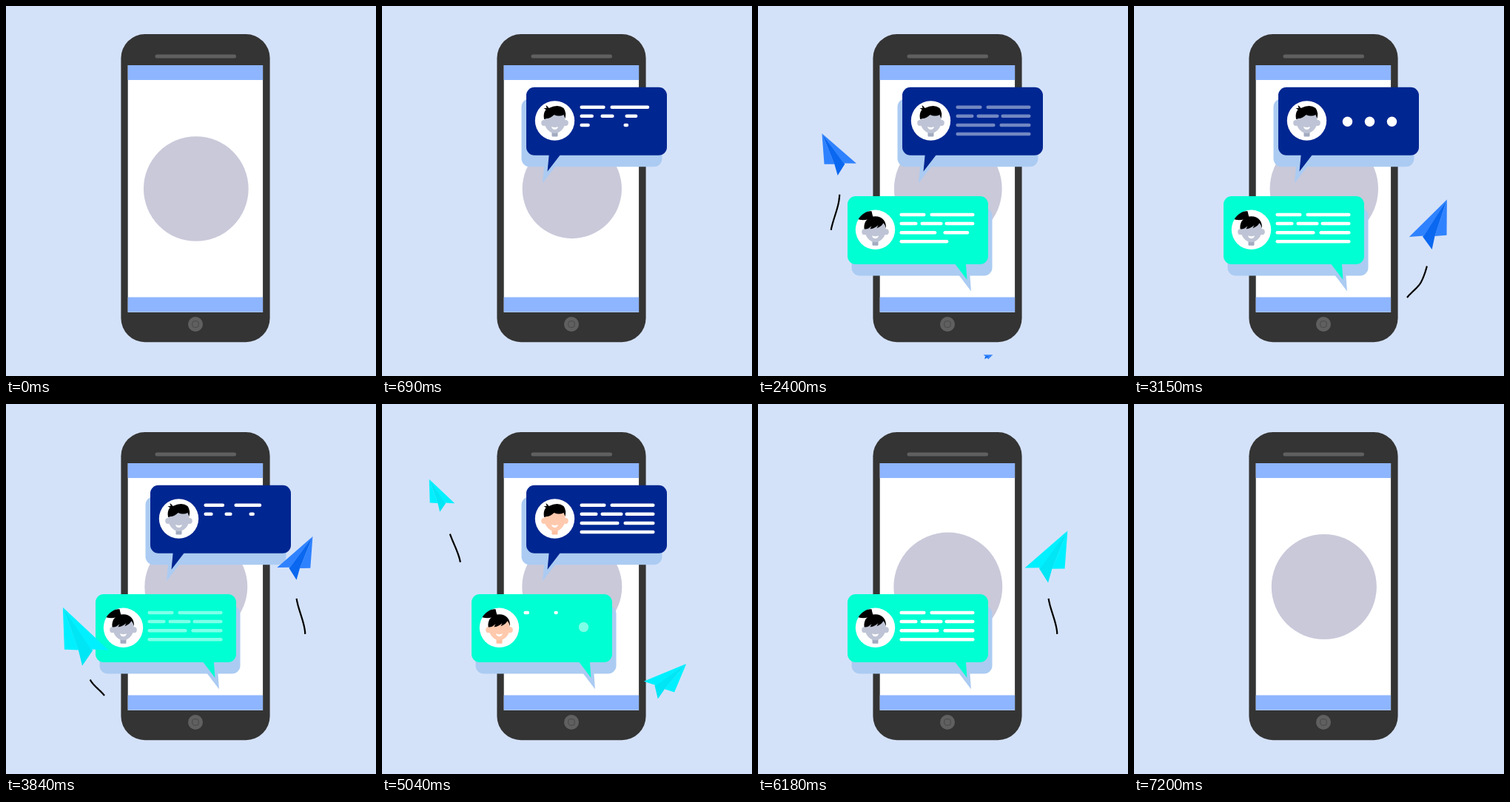
These frames come from a looping animation (500x500 px, 7230 ms). An HTML page with a canvas:

```html
<!DOCTYPE html>
<html>
<head>
<meta charset="utf-8">
<style>
html, body { margin: 0; width: 100%; height: 100%; overflow: hidden; background: #d4e2f9; }
canvas { display: block; width: 500px; height: 500px; }
</style>
</head>
<body>
<canvas id="stage" width="500" height="500"></canvas>
<script>
const g = document.getElementById('stage').getContext('2d');
const LOOP = 7230;

const clamp = v => Math.max(0, Math.min(1, v));
const ease = v => { v = clamp(v); return v * v * (3 - 2 * v); };
const ramp = (t, from, len) => ease((t - from) / len);

// Smooth curve through [input, value] pairs with ascending inputs
function curve(keys) {
  const slope = i => {
    const a = keys[Math.max(0, i - 1)], b = keys[Math.min(keys.length - 1, i + 1)];
    return (b[1] - a[1]) / (b[0] - a[0]);
  };
  return v => {
    let i = 0;
    while (i < keys.length - 2 && v > keys[i + 1][0]) i++;
    const [a, p] = keys[i], [b, q] = keys[i + 1];
    const d = b - a, u = clamp((v - a) / d), w = 1 - u;
    return p * w * w * (1 + 2 * u) + slope(i) * d * u * w * w
         + q * u * u * (3 - 2 * u) - slope(i + 1) * d * u * u * w;
  };
}

function box(x, y, w, h, r, color) {
  g.fillStyle = color;
  g.beginPath();
  g.roundRect(x, y, w, h, r);
  g.fill();
}

function poly(color, ...pts) {
  g.fillStyle = color;
  g.beginPath();
  for (let i = 0; i < pts.length; i += 2) g.lineTo(pts[i], pts[i + 1]);
  g.fill();
}

function oval(x, y, rx, ry, color) {
  g.fillStyle = color;
  g.beginPath();
  g.ellipse(x, y, rx, ry, 0, 0, 7);
  g.fill();
}

function shape(color, d) {
  g.fillStyle = color;
  g.fill(new Path2D(d));
}

function group(draw) {
  g.save();
  draw();
  g.restore();
}

function phone(t) {
  box(155.4, 38, 201.2, 416.3, 32.5, '#343434');
  box(201.5, 65.5, 109.5, 5, 2.5, '#606060');
  box(164.7, 80, 182.4, 334, 0, '#fff');
  box(164.7, 80, 182.4, 20, 0, '#8eb5ff');
  box(164.7, 393.4, 182.4, 20.4, 0, '#8eb5ff');
  oval(256, 430, 10, 10, '#606060');
  g.strokeStyle = '#484848';
  g.lineWidth = 1;
  g.beginPath();
  g.roundRect(251.8, 425.8, 8.4, 8.4, 2.5);
  g.stroke();
  const r = 70.2 + 3.6 * Math.cos(2 * Math.PI * (t / LOOP * 2 - 0.78));
  oval(256.8, 247, r, r, '#c9c9da');
}

// Head drawn around the centre of its white disc
function avatar(bun, skin, neck) {
  oval(0, 0, 26.7, 26.7, '#fff');
  box(-4, 12, 8, 9.5, 1, neck);
  oval(-14.5, 3, 3.8, 4, skin);
  oval(14.5, 3, 3.8, 4, skin);
  shape(skin, 'M-14 -5 Q-14 -16 0 -16 Q14 -16 14 -5 V3 C13 11 6 17 0 17 C-6 17 -13 11 -14 3 Z');
  shape('#fff', 'M-4.5 8 Q0 10 4.5 8 Q3.5 12 0 12 Q-3.5 12 -4.5 8 Z');
  if (bun) {
    shape('#000', 'M-23 -14 C-19 -21 -11 -26 -5 -25 Q-4 -20 -3 -17 Q-13 -11 -23 -14 Z');
    shape('#000', 'M-15 -1 C-16 -12 -9 -18 0 -18 C10 -18 15 -11 14.5 -2 Q13 -7 11 -9 Q8 -4 2 -2 L4 -6 Q-2 -1 -7 -1 L-5 -5 Q-10 0 -15 -1 Z');
  } else {
    shape('#000', 'M-14.5 -2 Q-16 -10 -12 -15 L-15 -17 L-11 -17 L-12 -21 Q-9 -19 -8 -17 Q4 -23 12 -17 Q16 -11 14 -3 L12 -8 Q6 -5 -1 -8 Q-6 -3 -11 -3 Z');
  }
}

// Text strokes: line number, start, end
const STROKES = [
  [0, 0, 35], [0, 41, 101], [1, 0, 24], [1, 28, 58], [1, 61, 101],
  [2, 0, 53], [2, 59, 101], [3, 0, 101]
];

function typed(t, start) {
  g.strokeStyle = '#fff';
  g.lineWidth = 4.5;
  g.lineCap = 'round';
  STROKES.forEach(([line, a, b], i) => {
    const k = ramp(t, start + i * 60, 480);
    if (k < 0.012) return;
    const y = line * 12.1, x = a + 2.2;
    g.beginPath();
    g.moveTo(x, y);
    g.lineTo(x + (b - a - 4.4) * k, y);
    g.stroke();
  });
}

function bubbleText(t, b, alpha) {
  if (t < b.retype) {
    g.globalAlpha = alpha * (1 - ramp(t, b.fade, 300));
    typed(t, b.type);
  }
  for (let i = 0; i < 3; i++) {
    const show = ramp(t, b.fade + 300 + i * 120, 240);
    const hide = ramp(t, b.retype - 265 + i * 120, 240);
    g.globalAlpha = alpha * show * (1 - hide);
    oval(21 + i * 30, 19.5, 6.7, 6.7, '#fff');
  }
  g.globalAlpha = alpha;
  typed(t, b.retype);
}

function body(b, color) {
  box(0, 0, 190, 92, 11, color);
  poly(color, ...b.tail);
}

function bubble(t, b) {
  const s = ramp(t, b.open, 400) * (1 - ramp(t, b.close, 430));
  if (s < 0.01) return;
  const inner = clamp(s * 2 - 1);
  const warm = t > 4500 && t < 5400;
  group(() => {
    const [px, py] = b.pivot;
    g.translate(px, py);
    g.rotate(b.side * (1 - s) * Math.PI / 2);
    g.scale(s, s);
    g.translate(b.x - px, b.y - py);
    group(() => {
      g.translate(b.shade * inner, 15.5 * inner);
      body(b, '#abcbf2');
    });
    body(b, b.color);
    group(() => {
      g.translate(b.face, 45.3);
      g.scale(inner, inner);
      avatar(b.bun, warm ? '#ffc9ad' : '#bec4d5', warm ? '#ffc0a0' : '#a3abc0');
    });
    group(() => {
      g.translate(b.text[0], b.text[1]);
      bubbleText(t, b, inner);
    });
  });
}

const BUBBLES = [
  { x: 195, y: 109.7, color: '#002691', side: -1, pivot: [251, 243], shade: -6.5,
    tail: [31, 88, 28.5, 114, 50, 86], face: 38.5, bun: false, text: [72.5, 27],
    open: 30, type: 260, fade: 2240, retype: 3515, close: 5400 },
  { x: 121, y: 257, color: '#00ffd2', side: 1, pivot: [255, 390], shade: 5.5,
    tail: [141, 86, 161.5, 113, 159.5, 86], face: 37.5, bun: true, text: [70.5, 25],
    open: 1395, type: 1697, fade: 3690, retype: 4945, close: 6720 }
];

// Left-hand flight; the right-hand one is its mirror image
const flyY = curve([[0, 487], [60, 475], [360, 382], [675, 326.5], [1500, 219],
  [1560, 211], [1860, 132], [2070, 48], [2115, 33]]);
const flyX = curve([[30, 33], [132, 77], [176, 92], [212, 105.5], [258, 110], [307, 98],
  [330, 101], [373, 114], [394, 133], [475, 193], [487, 205]]);
const flyTurn = curve([[0, -45], [60, -40], [360, -18], [675, 3], [1560, 0.5], [1860, 3], [2115, 3]]);
const flySize = curve([[0, 0.05], [60, 0.18], [360, 0.73], [675, 1], [1500, 0.9], [1860, 0.56], [2115, 0.12]]);

function trail(y) {
  const fade = Math.max(0, 210 - y) / 173;
  const head = y + 44;
  const tail = Math.min(394, head + 48 * (1 - fade * fade));
  if (tail <= head) return;
  g.strokeStyle = '#000';
  g.lineWidth = 2.2;
  g.lineCap = 'butt';
  g.beginPath();
  for (let i = 0; i <= 16; i++) {
    const v = head + (tail - head) * i / 16;
    g.lineTo(flyX(v), v);
  }
  g.stroke();
}

function plane(t, { start, mirrored, size, light, dark }) {
  const u = t - start;
  if (u < 0 || u > 2115) return;
  const y = flyY(u), k = flySize(u) * size;
  group(() => {
    if (mirrored) {
      g.translate(502, 0);
      g.scale(-1, 1);
    }
    trail(y);
    g.translate(flyX(y), y);
    g.rotate(flyTurn(u) * Math.PI / 180);
    g.scale(k, k);
    poly(dark, -22, -44, -2, 4, 3, 21, 14, 3);
    poly(light, -22, -44, -18, 3.5, -2, 3.5);
    poly(light, -22, -44, 12, 2, 32, 2);
  });
}

function planes(t) {
  const blue = t < 1700
    ? { size: 1, light: '#4a69b7', dark: '#4665b2' }
    : { size: 1, light: '#2f82ff', dark: '#0a67ef' };
  const cyan = { size: 1.2, light: '#00f0ff', dark: '#00e6f5' };
  plane(t, { start: 840, mirrored: false, ...blue });
  plane(t, { start: 2340, mirrored: true, ...blue });
  plane(t, { start: 3180, mirrored: false, ...cyan });
  plane(t, { start: 4680, mirrored: true, ...cyan });
}

const begin = performance.now();

function frame() {
  const t = (performance.now() - begin) % LOOP;
  box(0, 0, 500, 500, 0, '#d4e2f9');
  phone(t);
  BUBBLES.forEach(b => bubble(t, b));
  planes(t);
  requestAnimationFrame(frame);
}
frame();
</script>
</body>
</html>
```
